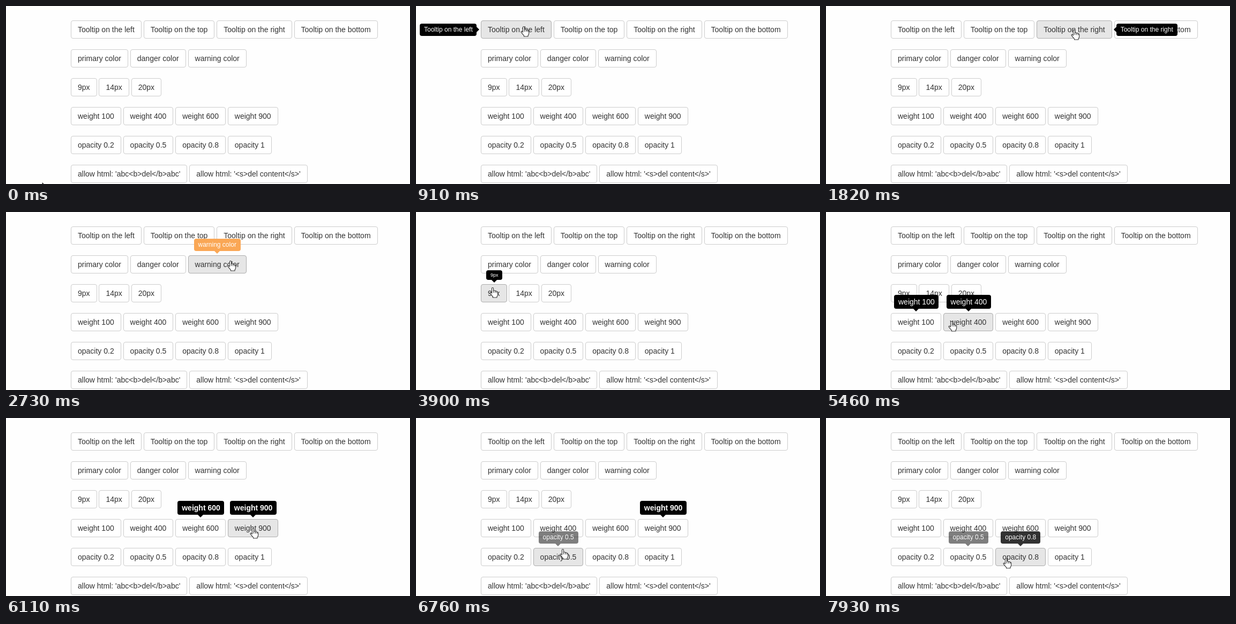
Recreate the animation shown at these times as an HTML page. Size 754x333 px, loop 8 s.

```html
<!DOCTYPE html>
<html lang="en">
<head>
<meta charset="utf-8">
<title>Tooltips</title>
<style>
  html, body { margin: 0; width: 100%; height: 100%; overflow: hidden; background: #fefefe; }
  body { position: relative; font: 14px/20px "Liberation Sans", Arial, sans-serif; color: #333; }
  .row { position: absolute; left: 121px; height: 34px; white-space: nowrap; }
  .btn { display: inline-block; position: relative; box-sizing: border-box; height: 34px;
    padding: 6px 12px; border: 1px solid #ccc; border-radius: 4px; background: #fff; vertical-align: top; }
  .btn.hover { background: #e6e6e6; border-color: #adadad; }
  .tip { --bg: #000; position: absolute; z-index: 2; box-sizing: border-box; visibility: hidden;
    padding: 3px 8px; border-radius: 4px; background: var(--bg); color: #fff; font-size: 12px; line-height: 1.43; }
  .tip.on { visibility: visible; }
  .tip::after { content: ""; position: absolute; border: 5px solid transparent; }
  .top { bottom: calc(100% + 9px); }
  .bottom { top: calc(100% + 9px); }
  .left { right: calc(100% + 9px); }
  .right { left: calc(100% + 9px); }
  .top::after, .bottom::after { left: calc(50% - 5.5px); }
  .left::after, .right::after { top: calc(50% - 5.5px); }
  .top::after { top: 100%; border-top-color: var(--bg); border-bottom: 0; }
  .bottom::after { bottom: 100%; border-bottom-color: var(--bg); border-top: 0; }
  .left::after { left: 100%; border-left-color: var(--bg); border-right: 0; }
  .right::after { right: 100%; border-right-color: var(--bg); border-left: 0; }
  #cursor { position: absolute; left: 0; top: 0; z-index: 3; overflow: visible; }
  #cursor path { fill: #fff; stroke: #333; stroke-width: 1.1; stroke-linejoin: round; }
</style>
</head>
<body>
<svg id="cursor" width="18" height="22">
  <path id="arrow" d="M0 0V15L3.5 11.8 6 17.5 8.5 16.4 6 11H10.8Z"/>
  <g id="hand">
    <path d="M-1.5 11V2Q-1.5 .5 0 .5T1.5 2V6.5Q2 5.4 3.4 5.8T4.7 7.2Q5.2 6.3 6.5 6.7T7.7 8.2Q8.4 7.5 9.2 8.1T9.7 10V13Q9.5 16 8 17.2V19H.5V17.3Q-2 14.8-4.7 11.2C-5.5 9.6-3.7 8.9-2.7 9.8Z"/>
    <path d="M1.5 6.5V10M4.7 7.2V10.3M7.7 8.2V10.6" style="fill:none"/>
  </g>
</svg>
<script>
const LOOP = 8000, STEP = 130, LINGER = 2, MOVE_SHARE = 0.7;

// Each button: label, tooltip side, tooltip styles
const sized = px => [px + "px", "top", { fontSize: px + "px" }];
const colored = (name, color) => [name + " color", "top", { "--bg": color }];
const rows = [
  ["left", "top", "right", "bottom"].map(side => ["Tooltip on the " + side, side]),
  [colored("primary", "#337ab7"), colored("danger", "#d9534f"), colored("warning", "#faa755")],
  [9, 14, 20].map(sized),
  [100, 400, 600, 900].map(w => ["weight " + w, "top", { fontSize: "14px", fontWeight: w }]),
  [0.2, 0.5, 0.8, 1].map(o => ["opacity " + o, "top", { opacity: o }]),
  [["allow html: 'abc<b>del</b>abc'"], ["allow html: '<s>del content</s>'"]]
];

// Pointer sweeps: each ends at a point, passing evenly timed button centres on the way
const sweeps = [
  { end: 0, at: [68, 331] },
  { end: 400, at: [95, 80] },
  { end: 910, at: [201, 38] },
  { end: 2730, at: [419, 91], via: ["Tooltip on the top", "Tooltip on the right", "Tooltip on the bottom"] },
  { end: 3900, at: [143, 141], via: ["danger color", "primary color"] },
  { end: 5460, at: [234, 204], via: ["14px", "20px", "weight 100"] },
  { end: 6760, at: [274, 245], via: ["weight 600", "weight 900", "weight 900"] },
  { end: 7930, at: [336, 262], via: ["opacity 0.2", "opacity 0.5"] }
];

function add(parent, className, text = "") {
  const el = document.createElement("div");
  el.className = className;
  el.textContent = text;
  parent.append(el);
  return el;
}

function addButton(row, [label, side, style = {}]) {
  const el = add(row, "btn", label);
  row.append(" ");
  if (!side) return { label, el };
  const tip = add(el, "tip " + side, label);
  for (const [name, value] of Object.entries(style)) {
    if (name.startsWith("--")) tip.style.setProperty(name, value);
    else tip.style[name] = value;
  }
  // Snap the tooltip to whole pixels and centre it on its button
  const { width, height } = tip.getBoundingClientRect();
  const w = Math.floor(width), h = Math.floor(height);
  tip.style.width = w + "px";
  tip.style.height = h + "px";
  if (side === "top" || side === "bottom") tip.style.left = Math.round((el.offsetWidth - w) / 2) - 1 + "px";
  else tip.style.top = Math.round((el.offsetHeight - h) / 2) - 1 + "px";
  return { label, el, tip };
}

const buttons = rows.flatMap((items, i) => {
  const row = add(document.body, "row");
  row.style.top = 27 + 54 * i + "px";
  return items.map(item => addButton(row, item));
});
for (const b of buttons) b.box = b.el.getBoundingClientRect();

function centre(label) {
  const { box } = buttons.find(b => b.label === label);
  return [box.left + box.width / 2, box.top + box.height / 2];
}

const path = sweeps.flatMap(({ end, at, via = [] }, i) => {
  const begin = i ? sweeps[i - 1].end : 0;
  const points = [...via.map(centre), at];
  return points.map(([x, y], k) => ({ t: begin + (end - begin) * (k + 1) / points.length, x, y }));
});

// Ease to each stop, then rest there for the remainder of the leg
function pointerAt(t) {
  const i = path.findIndex(p => p.t > t);
  if (i < 0) return path.at(-1);
  const a = path[i - 1], b = path[i];
  const u = Math.min(1, (t - a.t) / (b.t - a.t) / MOVE_SHARE), s = u * u * (3 - 2 * u);
  return { x: a.x + (b.x - a.x) * s, y: a.y + (b.y - a.y) * s };
}

function buttonAt(t) {
  const { x, y } = pointerAt(t);
  return buttons.find(({ box }) => x >= box.left && x < box.right && y >= box.top && y < box.bottom);
}

const cursor = document.getElementById("cursor");
const arrow = document.getElementById("arrow"), hand = document.getElementById("hand");

function draw(now) {
  const t = Math.floor(now % LOOP / STEP) * STEP;
  const hovered = buttonAt(t);
  // Tooltips stay up briefly after the pointer leaves
  const open = new Set();
  for (let i = 0; i <= LINGER; i++) open.add(buttonAt(Math.max(0, t - i * STEP)));

  for (const b of buttons) {
    b.el.classList.toggle("hover", b === hovered);
    b.tip?.classList.toggle("on", open.has(b));
  }
  const { x, y } = pointerAt(t);
  cursor.style.transform = `translate(${Math.round(x)}px, ${Math.round(y)}px)`;
  arrow.style.display = hovered ? "none" : "";
  hand.style.display = hovered ? "" : "none";
}

const start = performance.now();
function tick() {
  draw(performance.now() - start);
  requestAnimationFrame(tick);
}
tick();
</script>
</body>
</html>
```
